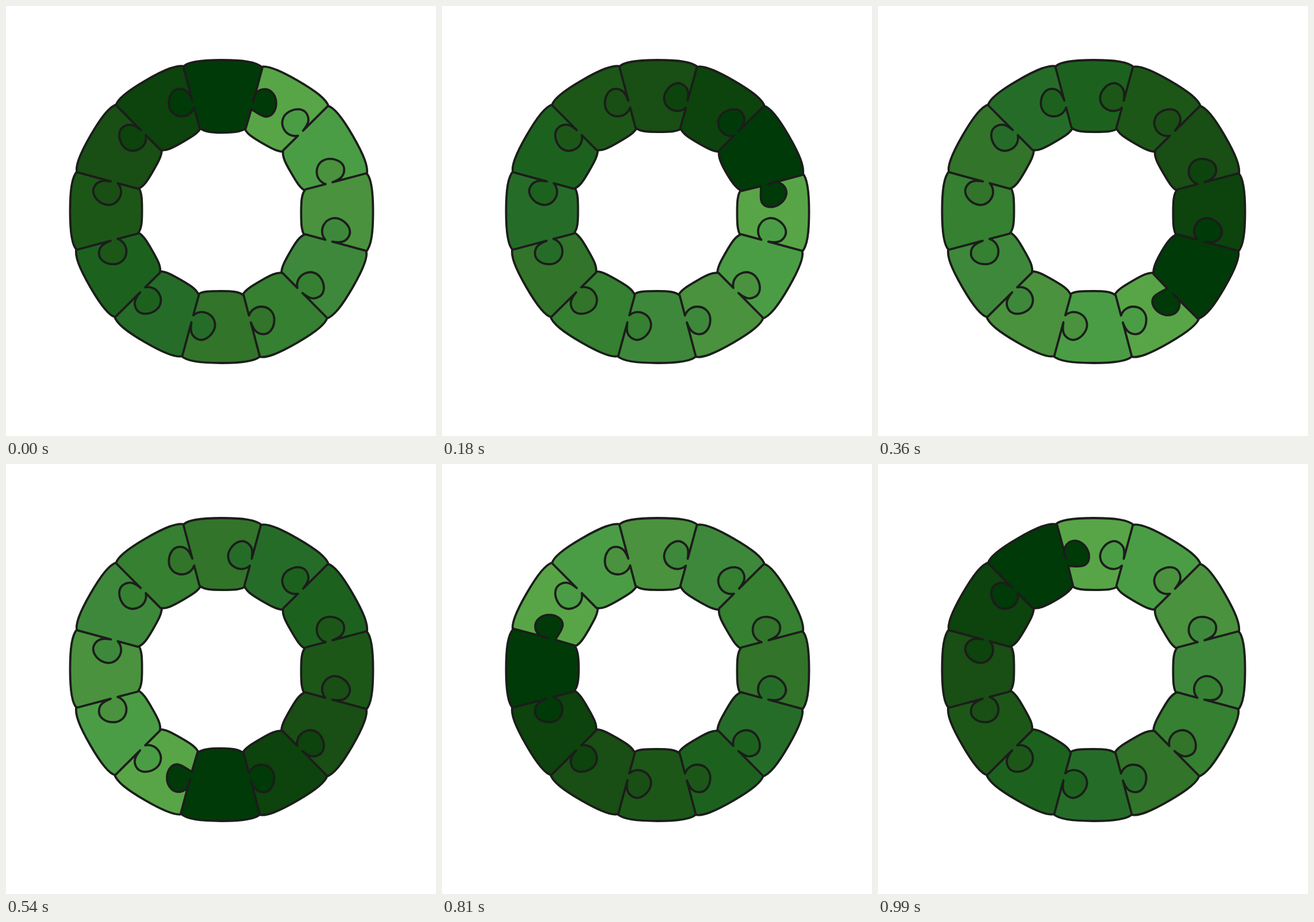
These frames come from a looping animation (748x748 px, 1.08 s). An HTML page with a canvas:

```html
<!DOCTYPE html>
<html lang="en">
<head>
<meta charset="utf-8">
<title>Puzzle ring</title>
<style>
  html, body { margin: 0; width: 100%; height: 100%; overflow: hidden; background: #fff; }
  canvas { display: block; }
</style>
</head>
<body>
<canvas id="stage" width="748" height="748"></canvas>
<script>
const ctx = document.getElementById('stage').getContext('2d');
const COUNT = 12, STEP = 90;
const CENTER = { x: 375, y: 357.5 };

// Darkest head first, fading counterclockwise to the tail.
const SHADES = [
  '#003a08', '#0d430c', '#194e15', '#1c5718', '#1c621e', '#266c29',
  '#32742a', '#358031', '#3e883b', '#4a923e', '#4a9d45', '#58a547'
];

// Piece at twelve o'clock, relative to the ring's center.
function makePiece(inner) {
  return new Path2D(`
    M-66.5 -252
    C-59 -260.5 -35 -263.5 0 -263.5
    C37 -263.5 61 -260.5 71 -250.5
    L55 -190.5
    C55 -205 65 -212.8 75 -212.8
    C87 -212.8 95 -201 95 -188.5
    C95 -176 88 -165 77.5 -165
    C70 -165 62 -172 51.8 -178
    L42 -144.5
    C33 -138.5 20 ${inner} 1 ${inner}
    C-18 ${inner} -31 -139 -38.5 -146
    L-47.7 -181
    C-51 -171 -60 -165.5 -69 -165.5
    C-83 -165.5 -91.7 -176 -91.7 -188
    C-91.7 -202 -84 -213.3 -73 -213.3
    C-61 -213.3 -56 -206 -50.9 -193
    Z`);
}

const plain = makePiece(-138.4);
const headPiece = makePiece(-137.2);

function drawPiece(slot, age) {
  const shape = age === 0 ? headPiece : plain;
  ctx.save();
  ctx.translate(CENTER.x, CENTER.y);
  ctx.rotate(slot * 2 * Math.PI / COUNT);
  ctx.fillStyle = SHADES[age];
  ctx.fill(shape);
  ctx.stroke(shape);
  ctx.restore();
}

function draw(now) {
  const head = Math.floor(now / STEP) % COUNT;
  ctx.fillStyle = '#fff';
  ctx.fillRect(0, 0, 748, 748);
  ctx.strokeStyle = '#1c1d1b';
  ctx.lineWidth = 3.8;
  ctx.lineJoin = 'round';
  // Tail first, so each piece overlaps the one behind it.
  for (let age = COUNT - 1; age >= 0; age--) drawPiece(head - age, age);
}

const start = performance.now();
function tick() {
  draw(performance.now() - start);
  requestAnimationFrame(tick);
}
tick();
</script>
</body>
</html>
```
